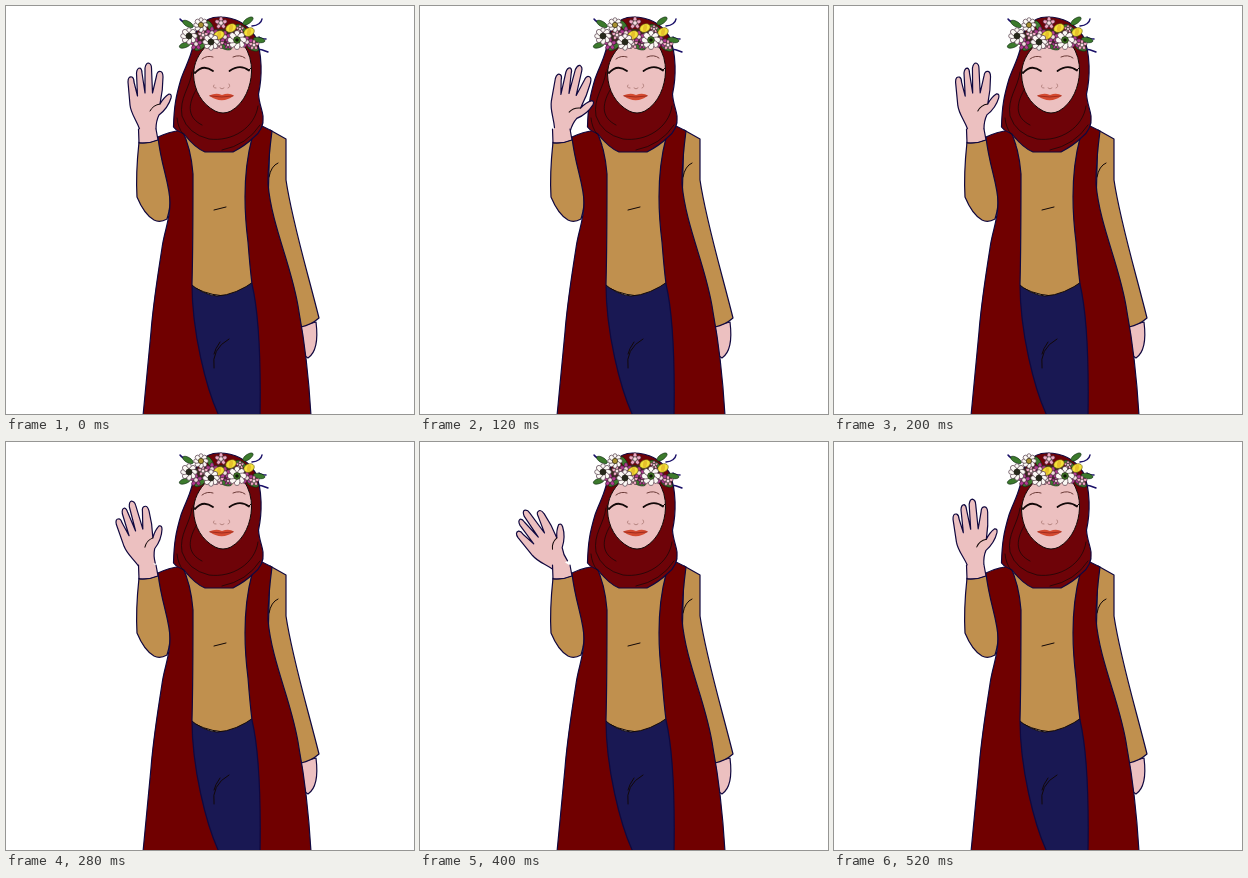
Animation of 408 by 408 pixels, one loop 0.56 s. Source, as an HTML page:

```html
<!DOCTYPE html>
<html lang="en">
<head>
<meta charset="utf-8">
<title>Waving hello</title>
<style>
  html, body { margin: 0; width: 100%; height: 100%; overflow: hidden; background: #fff; }
  svg { display: block; width: 100vw; height: 100vh; }
  path { stroke: #120808; stroke-width: 1; stroke-linejoin: round; stroke-linecap: round; }
  .wine { fill: #700000; }
  .scarf { fill: #6e0308; }
  .tan { fill: #c0904e; }
  .skin { fill: #ecc0c0; }
  .navy { fill: #191853; }
  .line { fill: none; }
  .bare { stroke: none; }
  .edge { stroke: #10083f; stroke-width: 1.2; }
  .lash { stroke-width: 1.8; }
  .brow { stroke: #6b3b38; }
  .nose { stroke: #b58480; }
  .strand { stroke: #1a1068; stroke-width: 1.5; }
</style>
</head>
<body>
<svg viewBox="0 0 408 408">
  <path class="skin edge" d="M295 320L310 316C312 332 311 346 302 352L299 350Z"/>
  <path class="tan" d="M178 124H250L252 282Q216 300 180 277Z"/>
  <path class="navy" d="M182 276Q197 289 211 290Q230 289 250 274L260 410H182Z"/>
  <path class="line" d="M223 333Q205 343 208 362M214 336Q209 343 208 348M208 204L220 201"/>

  <path class="tan edge" d="M133 136Q142 138 153 133C158 165 170 186 161 213Q154 217 148 214C141 210 136 203 131 191C130 175 131 155 133 136Z"/>
  <path class="tan edge" d="M264 124L280 133V174C286 215 301 264 313 312Q305 319 295 321L262 200Z"/>
  <path class="line" d="M263 171Q265 160 272 157"/>

  <path class="wine edge" d="M176 124Q162 126 152 131C155 160 164 178 164 197C164 214 158 226 156 242C150 280 147 300 145 326L137 410H213C200 382 186 326 186 278C187 240 187 200 187 168Q185 142 176 124Z"/>
  <path class="wine edge" d="M246 132C237 166 238 204 242 236Q244 262 246 278C253 308 255 350 254 410H305C303 375 299 338 293 306C287 262 266 222 262 178C262 160 264 140 266 125L254 119Z"/>

  <path class="scarf edge" d="M213 11C197 11 188 24 187 40C184 54 179 61 175 73C170 90 168 100 167.500 121C171 126 175 126 178 128Q189 142 199 146H227Q240 139 247 132C255 126 258 119 257 110C256 103 253 97 252.500 88C256 72 257 48 249 30Q237 11 213 11Z"/>
  <path class="skin" d="M202 38C192 48 188 57 187.500 68C188 85 196 98 209 105Q217 109 225 105C239 97 245 80 245.500 66Q246 51 238 39Z"/>
  <path class="line" d="M186 66C184 82 173 92 176 110Q182 128 203 133C226 136 249 122 252 100M190 84C181 100 182 112 196 119M177 128Q172 122 171 112M216 144Q241 139 254 119" stroke-opacity=".7"/>

  <path class="line lash" d="M189 67Q197 57.500 207 65M223.500 65Q234 57.500 243 64.500"/>
  <path class="line" d="M189 67L187 64M243 64L245 62"/>
  <path class="line brow" d="M196 53Q201 49 207 51M227 51Q234 48 239 52"/>
  <path class="line nose" d="M208 79Q206 82 210 82M214 82Q216 84 218 82M222 82Q225 81 223 78"/>
  <path class="bare" d="M203 89.500Q209 87 213 88L216 89L219 88Q224 87 228 89.500Q216 99 203 89.500Z" fill="#d34a30"/>
  <path class="line" d="M204 90Q216 92 227 90" style="stroke:#8c2018;stroke-width:.7"/>

  <path class="line strand" d="M174 13Q177 17 183 17M256 13Q255 19 246 20M253 31Q255 33 260 33M249 43Q256 43 262 46"/>
  <g id="crown"></g>

  <g id="hand">
    <path class="skin edge" d="M134 124C130 113 125 108 124 99L122 76Q122 70 126 71Q128 72 128 76L131.500 90L130.500 67Q131 62 134 62Q136 63 136 67L139 87V62Q140 57 142.500 57Q145.500 58 145.500 62L146.500 87L150.500 70Q151 65 154.500 65.500Q157 66 157 71Q157 84 154 98Q158 91 163 88Q166 88 165 92Q162 102 153 109Q150 115 150 123"/>
    <path class="line" d="M154 98Q147 99 144 105"/>
  </g>
  <path class="skin bare" d="M132.500 124Q142 116 150 124L152 133.500Q142 138 133 136Z"/>
  <path class="line edge" d="M132.500 123L133 137Q142 138 152 134L150 123"/>
</svg>
<script>
const NS = 'http://www.w3.org/2000/svg';
const crown = document.getElementById('crown');
const hand = document.getElementById('hand');

function add(tag, attrs) {
  const el = document.createElementNS(NS, tag);
  for (const key in attrs) el.setAttribute(key, attrs[key]);
  crown.append(el);
}

function oval(x, y, rx, ry, angle, fill, stroke) {
  add('ellipse', { rx, ry, fill, stroke, 'stroke-width': .6,
    transform: `translate(${x} ${y}) rotate(${angle})` });
}

const leaf = (x, y, angle) => oval(x, y, 6, 2.6, angle, '#3c7a2c', '#0d2b10');

function flower(x, y, r, color, heart, petals) {
  for (let i = 0; i < petals; i++) {
    const turn = i / petals * 360 - 90, a = turn * Math.PI / 180;
    oval(x + Math.cos(a) * r * .6, y + Math.sin(a) * r * .6, r * .45, r * .32, turn, color, '#3a2030');
  }
  oval(x, y, r * .38, r * .38, 0, heart, '#1c1c10');
}

const white = '#fbf8f4', pink = '#f0a8c4', plum = '#b23a92', gold = '#f4e23a', dark = '#26281a';

oval(214, 32, 30, 9, 0, '#3a2a1c', 'none');
[[182, 18, 30], [179, 39, -20], [242, 15, -35], [253, 34, 10], [204, 20, 60], [220, 41, 15],
 [194, 41, -30], [235, 22, 30], [247, 42, 20]].forEach(l => leaf(...l));

[[190, 38, 6, plum], [206, 27, 6, plum], [219, 31, 6, plum], [215, 17, 6, pink], [197, 29, 5, pink],
 [213, 38, 5, pink], [241, 36, 6, plum], [248, 39, 5, pink], [222, 39, 4, plum], [234, 23, 4, pink]]
  .forEach(([x, y, r, color]) => flower(x, y, r, color, '#f6dce4', 5));

[[225, 22], [243, 26], [213, 29]].forEach(([x, y]) => {
  oval(x, y, 5.5, 4, -25, gold, '#6a5a10');
  oval(x, y, 2, 3.4, 10, '#e6c02c', 'none');
});

[[195, 19, 7, '#a89030'], [183, 30, 8, dark], [205, 36, 8, dark], [231, 34, 9, '#3f7a24']]
  .forEach(([x, y, r, heart]) => flower(x, y, r, white, heart, 8));
oval(231, 34, 1.8, 1.8, 0, '#101808', 'none');

// Hand angle in degrees, one pose every 40 ms.
const swing = [0, 5, 10, 15, 7.5, -.5, -7.5, -14.5, -21.5, -28.5, -34, -24.5, -14, -3.5];
const STEP = 40;

// Setting the attribute keeps the outline sharp at every angle.
function draw(now) {
  const pose = Math.floor(now / STEP) % swing.length;
  hand.setAttribute('transform', `rotate(${swing[pose]} 142 125)`);
  requestAnimationFrame(draw);
}
const start = performance.now();
draw(0);
function tick() { }
</script>
</body>
</html>
```
